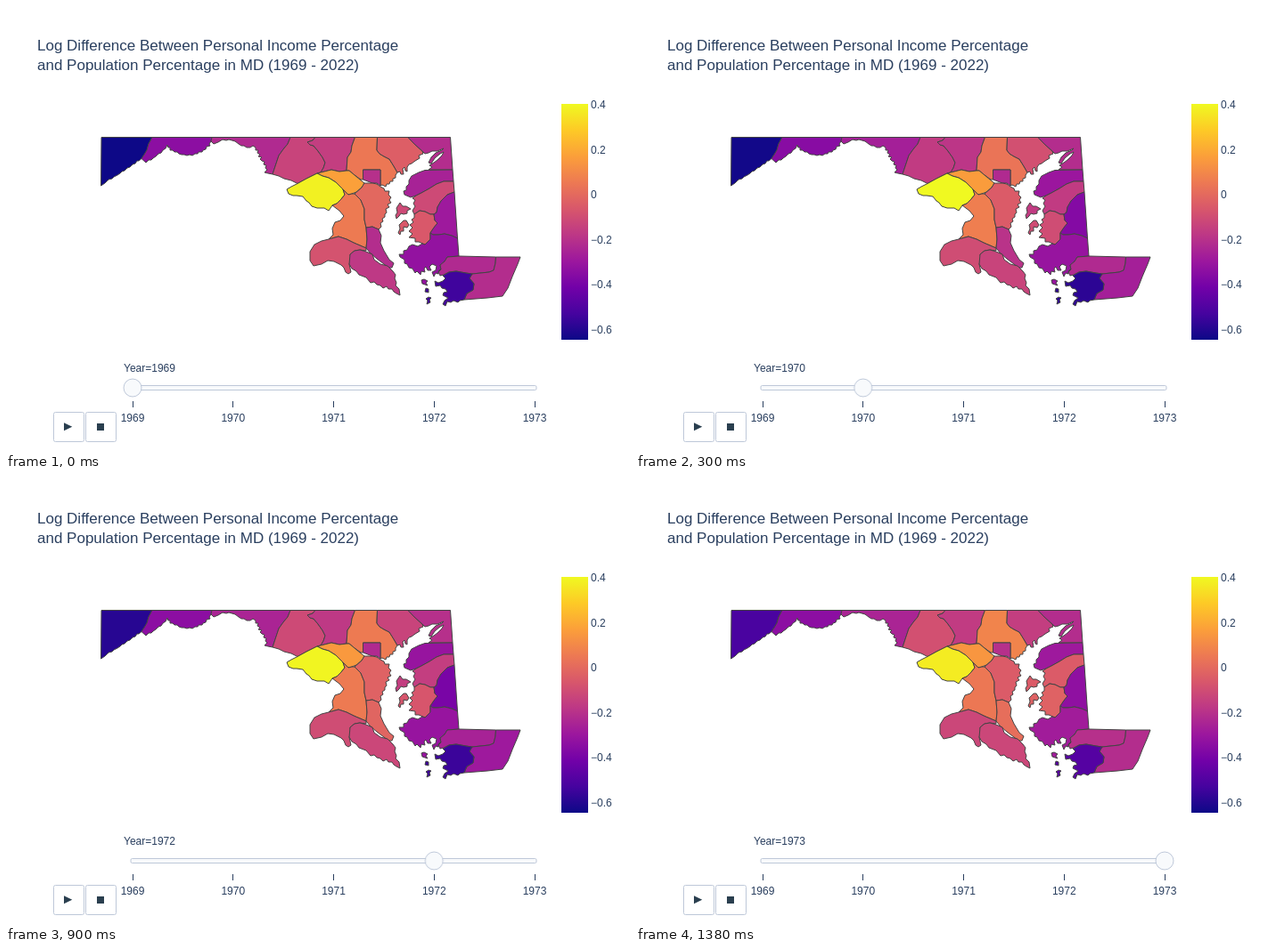
An HTML page that plays this animation: 700x500 px, repeating every 1500 ms.

```html
<!DOCTYPE html>
<html lang="en">
<head>
<meta charset="utf-8">
<title>Income and population by county</title>
<style>
  html, body { margin: 0; width: 100%; height: 100%; overflow: hidden; background: #fff; }
  svg { display: block; }
  text { font: 12px "Liberation Sans", Arial, sans-serif; fill: #2a3f5f; white-space: pre; }
  .title text { font-size: 17px; }
  .mid { text-anchor: middle; }
  #map path { stroke: #444; stroke-width: 1; stroke-linejoin: round; }
  .control { fill: #f8fafc; stroke: #bec8d9; }
  .button { fill: #fff; stroke: #bec8d9; }
  .icon { fill: #2a3f4f; }
  #knob { animation: slide 1500ms step-end infinite; }
  @keyframes slide {
    0% { transform: translateX(0); }
    20% { transform: translateX(112.75px); }
    40% { transform: translateX(225.5px); }
    60% { transform: translateX(338.25px); }
    80%, 100% { transform: translateX(451px); }
  }
</style>
</head>
<body>
<svg width="700" height="500" viewBox="0 0 700 500">
  <defs><linearGradient id="plasma" x1="0" y1="1" x2="0" y2="0"></linearGradient></defs>

  <g class="title">
    <text x="35" y="50">Log Difference Between Personal Income Percentage</text>
    <text x="35" y="72">and Population Percentage in MD (1969 - 2022)</text>
  </g>

  <!-- data-t: yearly position on the colour scale, in percent -->
  <g id="map">
    <path data-t="0 1 1 5 12" d="M107 147.5H164L160 155 158 162 155 167 152 171.5 149 174 147 174 145 177 142 178 139 181 136 182 133 185 130 186 128 188 125 190 121 192 119 194 115 195 111 199 106.5 202Z"/>
    <path data-t="29 28 29 29 29" d="M164 147.5H231L230 152 228 155 229 157 225 158 224 161 221 162 220 164 216 164 215 166 212 166 209 168 206 167 203 168 200 167 197 167 194 166 192 164 189 164 187 162 184 162 184 159 182 159 181 156 179 160 176 162 174 165 171 166 168 169 165 171 163 173 160 173 157 176 152 171.5 155 167 158 162 160 155Z"/>
    <path data-t="40 36 38 38 38" d="M231 147.5H319L316 155 311 161 306 168 304 174 302 180 299 189 294 188 290 187 293 184 291 182 292 179 289 178 290 175 287 174 285 172 287 170 283 169 285 167 282 165 283 162 280 162 280 159 277 157 274 159 270 159 267 157 264 157 261 155 257 152 250 150 247 151 243 150 238 153 233 155 230 152Z"/>
    <path data-t="49 46 48 51 53" d="M319 147.5H347L344 151 338 153 341 156 345 157 350 163 355 170 358 176 356 182 353 187 349 188 337 194 327 199.5 320 196 312 194 306 191 299 189 302 180 304 174 306 168 311 161 316 155Z"/>
    <path data-t="47 44 44 45 46" d="M347 147.5H391.5L388 157 387 164 383 170 382 185 374 186 365 184 353 187 356 182 358 176 355 170 350 163 345 157 341 156 338 153 344 151Z"/>
    <path data-t="66 65 65 67 70" d="M391.5 147.5H416.5L416 162 419 166 424 169 430 172 435 180 439 187 437 190 437 193 434 194 434 197 431 197 430 200 427 200 426 203 422 201 420 202V184H400.5V195L398 195 391 190 385 185 382 185 383 170 387 164 388 157Z"/>
    <path data-t="58 53 50 49 47" d="M416.5 147.5H451L458 155 467 163 468 166 463 168 464 171 459 174 455 177 452 178 450 181 450 186 448 185 447 181 445 183 446 189 443 189 442 186 439 187 435 180 430 172 424 169 419 166 416 162Z"/>
    <path data-t="41 41 42 42 41" d="M451 147.5H498.5L501 184H474L478 181 475 179 480 176 484 173 489 168 491 164 487 166 481 171 477 177 474 176 477 170 482 165 489 162 491 160 484 163 478 163 474 165 470 166 467 163 458 155Z"/>
    <path data-t="42 40 40 40 42" d="M400.5 184H420V202L416 199 411 199 400.5 195Z"/>
    <path data-t="78 77 77 76 75" d="M349 188L353 187 365 184 374 186 382 185 385 185 391 190 397 195 402 199 399 204 393 209 388 211 384 212 378 206 370 198 362 193 355 191Z"/>
    <path data-t="98 100 100 99 97" d="M349 188L355 191 362 193 370 198 378 206 380 212 376 217 371 222 366 224 362 230 357 227 349 227 343 225 340 221 337 219 333 214 326 213 322 213 317 211 315 206 320 203 327 199.5 337 194Z"/>
    <path data-t="67 68 68 67 66" d="M378 206L384 212 388 211 391 211 398 218 402 228 402 240 404 249 405 262 404 272 397 269 390 266 382 262 373 259 362 262 367 257 366 250 369 243 375 241 379 236 374 230 366 224 371 222 376 217 380 212Z"/>
    <path data-t="61 57 58 59 57" d="M402 199L411 199 416 200 420 203 424 205 425 208 430 208 429 212 432 215 430 218 432 221 428 223 430 226 426 228 427 232 425 234 425 237 422 239 423 242 420 244 421 248 418 251 411 248 404 249 402 240 402 228 398 218 391 211 399 204Z"/>
    <path data-t="41 43 57 60 63" d="M404 249L411 248 418 251 421 258 420 266 424 275 430 285 435 289 433 294 429 294 424 290 416 284 409 278 404 272 405 262Z"/>
    <path data-t="54 52 53 52 50" d="M362 262L373 259 382 262 390 266 397 269 404 272 404 275 397 274 391 275 386 279 387 284 385 290 387 299 384 301 381 299 379 294 376 291 368 287 361 286 354 290 345 292 341 286 341 276 346 268 354 264Z"/>
    <path data-t="45 49 47 50 50" d="M386 279L391 275 397 274 404 276 411 279 413 285 420 290 428 292 434 298 437 302 436 306 438 311 437 314 441 318 442 325 438 323 435 321 433 318 429 318 427 315 423 317 420 314 416 313 413 310 409 311 404 305 396 302 393 298 388 295 385 290Z"/>
    <path data-t="37 33 30 32 34" d="M501 184L502 197 491 197 483 200 475 205 466 210 460 213 454 215 447 212 446 208 449 207 449 203 452 200 452 196 455 191 463 187 470 184.5Z"/>
    <path data-t="51 46 43 47 57" d="M502 197L503 209 495 212 488 219 484 226 483 232 480 234 476 234 470 231 464 230 458 234 456 230 459 225 457 222 459 218 456 216 460 213 466 210 475 205 483 200 491 197ZM442 221L445 225 449 225 454 228 450 230 450 233 446 234 443 233 441 236 438 239 437 235 439 232 438 227Z"/>
    <path data-t="56 52 52 55 59" d="M458 234L464 230 470 231 476 234 480 234 481 241 484 244 480 249 476 255 476 262 470 268 463 265 459 265 459 261 452 260 456 256 452 253 456 249 453 246 457 243 455 240 458 238ZM446 241L449 241 452 246 450 249 446 248 446 253 443 253 442 257 440 255 442 250 441 246Z"/>
    <path data-t="34 27 21 24 30" d="M503 209L506.5 261 500 258 492 256 485 257 479 257 476 255 480 249 484 244 481 241 480 234 483 232 484 226 488 219 495 212Z"/>
    <path data-t="31 32 29 32 35" d="M476 255L479 257 485 257 492 256 500 258 506.5 261 508 281 495 282 492 287 487 291 488 295 485 298 485 301 482 300 480 304 478 299 482 297 483 292 478 290 475 293 477 297 473 297 471 293 469 295 470 299 466 298 465 302 461 298 459 300 456 295 452 294 450 290 447 289 447 285 442 282 441 279 446 279 446 275 450 274 452 270 456 268 462 270 467 267 470 268 476 262ZM466 308L469 307 473 309 471 311 473 314 467 312Z"/>
    <path data-t="40 40 36 37 42" d="M508 281L549.5 282 549 289 547 297 542 299 523 301 516 300 505 298 497 299 491 302 487 303 485 299 488 296 487 291 492 287 495 282Z"/>
    <path data-t="41 36 31 34 41" d="M549.5 282H577L574 290 568 304 563 317 557 326 540 328 514 330 517 323 524 319 525 312 520 306 523 301 542 299 547 297 549 289Z"/>
    <path data-t="10 6 3 9 15" d="M490 303L497 299 505 298 516 300 523 301 520 306 525 312 524 319 517 323 514 330 509 331 507 333 502 331 499 333 495 332 493 337 490 335 492 331 496 328 490 325 491 322 495 321 493 318 489 317 487 314 482 315 481 309 485 311 490 309 493 306ZM471 317L474 318 474 322 470 321ZM471 329L474 327 477 328 475 330 476 333 472 335 473 331Z"/>
  </g>

  <rect x="623" y="110" width="30" height="265" fill="url(#plasma)"/>
  <g id="scale"></g>

  <text id="year" x="132" y="411">Year=1969</text>
  <rect class="control" x="140" y="426.5" width="455" height="5" rx="1.5"/>
  <g id="ticks"></g>
  <circle id="knob" class="control" cx="142" cy="429" r="10"/>

  <rect class="button" x="53.5" y="456.5" width="34" height="33" rx="2"/>
  <rect class="button" x="89.5" y="456.5" width="34" height="33" rx="2"/>
  <path class="icon" d="M65 468.3L74.3 472.8 65 477.3Z"/>
  <rect class="icon" x="102" y="469" width="8" height="8"/>
</svg>
<script>
  const stops = ['0d0887', '46039f', '7201a8', '9c179e', 'bd3786',
                 'd8576b', 'ed7953', 'fb9f3a', 'fdca26', 'f0f921'];
  const firstYear = 1969, count = 5, hold = 300;
  const find = id => document.getElementById(id);

  function add(parent, name, attrs, content = '') {
    const node = document.createElementNS('http://www.w3.org/2000/svg', name);
    for (const key in attrs) node.setAttribute(key, attrs[key]);
    node.textContent = content;
    parent.append(node);
  }

  function plasma(percent) {
    const pos = percent / 100 * (stops.length - 1);
    const i = Math.min(Math.floor(pos), stops.length - 2);
    const channel = (hex, c) => parseInt(hex.substr(c * 2, 2), 16);
    const mix = [0, 1, 2].map(c => {
      const from = channel(stops[i], c);
      return Math.round(from + (channel(stops[i + 1], c) - from) * (pos - i));
    });
    return `rgb(${mix})`;
  }

  stops.forEach((hex, i) =>
    add(find('plasma'), 'stop', { offset: i / (stops.length - 1), 'stop-color': '#' + hex }));

  ['0.4', '0.2', '0', '−0.2', '−0.4', '−0.6'].forEach((label, i) =>
    add(find('scale'), 'text', { x: 656, y: Math.round(115 + i * 50.6) }, label));

  for (let i = 0; i < count; i++) {
    const x = 142 + i * 112.75;
    add(find('ticks'), 'path', { d: `M${Math.floor(x) + 0.5} 444v7`, stroke: '#2a3f5f' });
    add(find('ticks'), 'text', { x, y: 467, class: 'mid' }, firstYear + i);
  }

  const counties = [...document.querySelectorAll('#map path')].map(path => ({
    path, colors: path.dataset.t.split(' ').map(plasma)
  }));
  const knobMotion = find('knob').getAnimations()[0];
  let shown = -1;

  function draw(now) {
    const time = now % (count * hold);
    const step = Math.floor(time / hold);
    if (step !== shown) {
      shown = step;
      for (const { path, colors } of counties) path.setAttribute('fill', colors[step]);
      find('year').textContent = 'Year=' + (firstYear + step);
      // Keep the slider on the same clock as the map.
      if (knobMotion) knobMotion.currentTime = time;
    }
    requestAnimationFrame(draw);
  }
  draw(performance.now());
</script>
</body>
</html>
```
